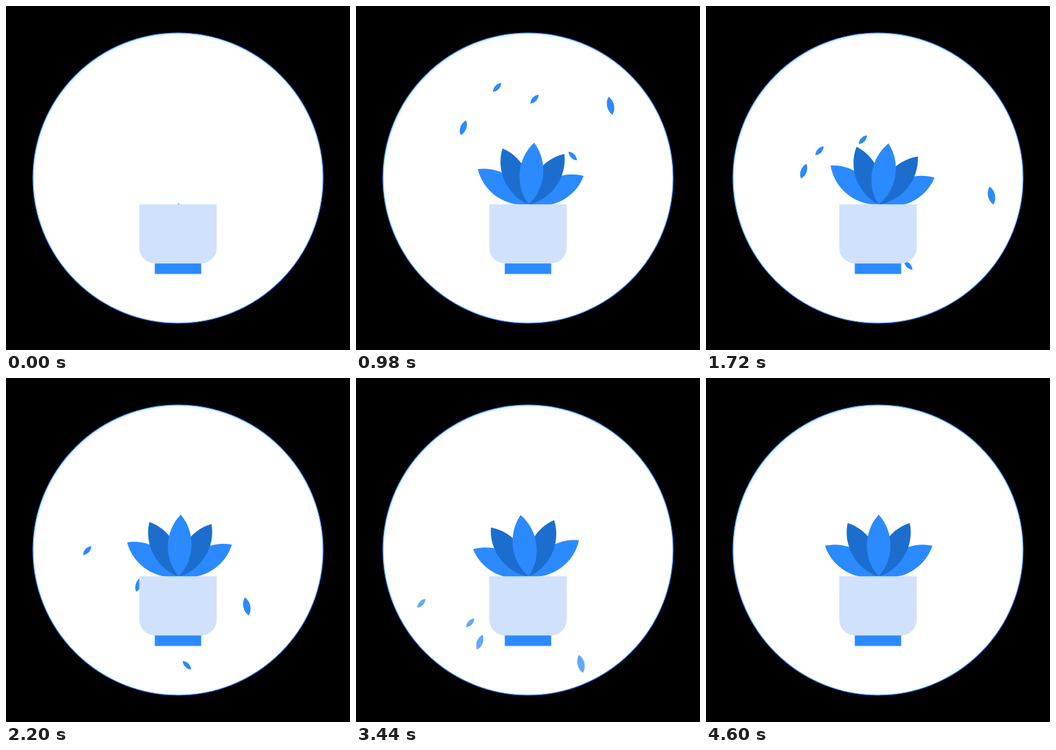
These frames come from a looping animation (500x500 px, 4800 ms). An HTML page with a canvas:

```html
<!DOCTYPE html>
<html lang="en">
<head>
<meta charset="utf-8">
<title>Potted plant</title>
<style>
html, body { margin: 0; width: 100%; height: 100%; overflow: hidden; background: #000; }
canvas { display: block; width: 500px; height: 500px; }
</style>
</head>
<body>
<canvas id="stage" width="500" height="500"></canvas>
<script>
const ctx = document.getElementById('stage').getContext('2d');
const BLUE = '#2b8aff', DARK = '#1b6ece', PALE = '#d0e1fb';
const LOOP = 4800, STEP = 20;
const START = 340, GROWN = 860, RIGHTMOST = 1580, LEFTMOST = 2980;
const FADE = 540;

// Petals burst out of the pot, then drift through one place per key time
const SOURCE = [250, 300];
const KEYS = [980, 1720, 2200, 2840, 3440];
const petals = [
  { length: 23, tilt: 20, fade: 3300,
    path: [[156, 177], [142, 240], [193, 300], [205, 345], [180, 384]] },
  { length: 17.5, tilt: 43, fade: 3300,
    path: [[205, 118.5], [165, 210.5], [118, 251], [94, 284], [95, 327.5]] },
  { length: 17.5, tilt: 43, fade: 3300,
    path: [[259.5, 135.5], [228, 194.5], [210, 264], [194, 317.5], [166, 356]] },
  { length: 17.5, tilt: -44, fade: 2640,
    path: [[315, 218], [294, 377], [263, 417.5], [267, 453.5], [272, 465]] },
  { length: 27, tilt: -12, fade: 3300,
    path: [[370, 145], [415, 275.5], [350, 332], [309, 378], [327, 415.5]] }
];

const part = (t, a, b) => Math.min(1, Math.max(0, (t - a) / (b - a)));
const ease = (t, a, b) => (1 - Math.cos(Math.PI * part(t, a, b))) / 2;
const mix = (a, b, u) => a + (b - a) * u;

// Cubic from a to b with speeds va and vb at its ends
function hermite(t, t0, t1, a, b, va, vb) {
  const u = part(t, t0, t1), v = 1 - u;
  return mix(a, b, u * u * (3 - 2 * u)) + u * v * (t1 - t0) * (v * va - u * vb);
}

function follow(path, t, axis) {
  const last = KEYS.length - 1;
  const value = i => path[i][axis];
  const speed = i => {
    const a = Math.max(0, i - 1), b = Math.min(last, i + 1);
    return (value(b) - value(a)) / (KEYS[b] - KEYS[a]);
  };
  if (t < KEYS[0]) {
    const kick = axis ? 5 : 2;
    const launch = kick * (value(0) - SOURCE[axis]) / (KEYS[0] - START);
    return hermite(t, START, KEYS[0], SOURCE[axis], value(0), launch, speed(0));
  }
  if (t >= KEYS[last]) return value(last) + speed(last) * (t - KEYS[last]);
  const i = KEYS.findIndex(k => k > t) - 1;
  return hermite(t, KEYS[i], KEYS[i + 1], value(i), value(i + 1), speed(i), speed(i + 1));
}

// Side runs from -2 (outer left) to 2 (outer right); outer leaves bend less outwards
function sway(t, side) {
  const right = side === 2 ? 4.5 : 9.6, left = side === -2 ? -4.5 : -9.2;
  if (t < RIGHTMOST) return right * ease(t, START, RIGHTMOST);
  if (t < LEFTMOST) return mix(right, left, ease(t, RIGHTMOST, LEFTMOST));
  return left * (1 - ease(t, LEFTMOST, side > 0 ? 4100 : 4600));
}

// Pointed leaf growing upward from (0, base)
function blade(length, base, color) {
  const w = length * 0.254, low = base - length * 0.28, high = base - length * 0.72;
  ctx.beginPath();
  ctx.moveTo(0, base);
  ctx.bezierCurveTo(-w, low, -w, high, 0, base - length);
  ctx.bezierCurveTo(w, high, w, low, 0, base);
  ctx.fillStyle = color;
  ctx.fill();
}

function place(x, y, degrees, scale, draw) {
  ctx.save();
  ctx.translate(x, y);
  ctx.rotate(degrees * Math.PI / 180);
  ctx.scale(scale, scale);
  draw();
  ctx.restore();
}

function drawDisc() {
  ctx.fillStyle = '#000';
  ctx.fillRect(0, 0, 500, 500);
  const glow = ctx.createRadialGradient(250.5, 251, 208, 250.5, 251, 212);
  glow.addColorStop(0, '#fff');
  glow.addColorStop(1, '#cfe3ff');
  ctx.beginPath();
  ctx.arc(250, 250, 211, 0, 2 * Math.PI);
  ctx.fillStyle = glow;
  ctx.fill();
  ctx.strokeStyle = BLUE;
  ctx.lineWidth = 1.1;
  ctx.stroke();
}

function drawPetals(t) {
  if (t <= START) return;
  for (const { length, tilt, fade, path } of petals) {
    ctx.globalAlpha = 1 - part(t, fade, fade + FADE);
    place(follow(path, t, 0), follow(path, t, 1), tilt, part(t, START, 500),
      () => blade(length, length / 2, BLUE));
  }
  ctx.globalAlpha = 1;
}

function drawPlant(t) {
  const scale = mix(0.02, 1, ease(t, START, GROWN));
  for (const side of [-2, 2, -1, 1, 0]) {
    const color = side % 2 ? DARK : BLUE;
    place(251, 288.5, 30.1 * side + sway(t, side), scale, () => blade(90, 0, color));
  }
}

function drawPot() {
  ctx.fillStyle = BLUE;
  ctx.fillRect(216.3, 374, 67.4, 15.5);
  ctx.fillStyle = PALE;
  ctx.beginPath();
  ctx.roundRect(193.7, 288.3, 112.6, 86, [0, 0, 23, 23]);
  ctx.fill();
}

const begin = performance.now();
function tick() {
  const t = Math.max(0, performance.now() - begin) % LOOP;
  const now = Math.floor(t / STEP) * STEP;
  drawDisc();
  drawPetals(now);
  drawPlant(now);
  drawPot();
  requestAnimationFrame(tick);
}
tick();
</script>
</body>
</html>
```
